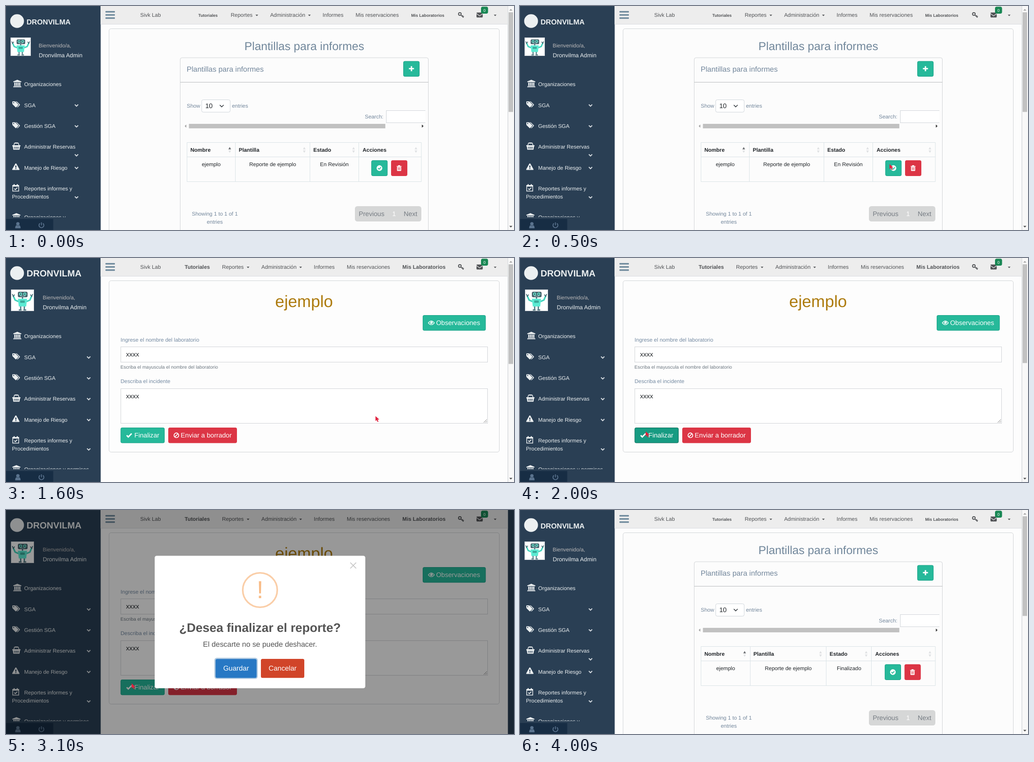
Recreate the animation shown at these times as an HTML page. Size 1124x498 px, loop 4.5 s.

```html
<!DOCTYPE html>
<html lang="es">
<head>
<meta charset="utf-8">
<title>Plantillas para informes</title>
<style>
  html, body { margin: 0; width: 100%; height: 100%; overflow: hidden; background: #2a3f54; }
  svg { display: block; width: 1124px; height: 498px; }
  text { font-family: "Liberation Sans", Arial, sans-serif; text-rendering: geometricPrecision; white-space: pre; }
</style>
</head>
<body>
<svg id="stage" viewBox="0 0 1124 498">
  <defs>
    <clipPath id="menuClip"><rect width="209" height="469.5"/></clipPath>
    <clipPath id="searchClip"><rect x="830" y="225" width="98" height="40"/></clipPath>
    <g id="bank"><path d="M9 0 18 3.8V5.2H0V3.8ZM2.3 6.2H5V12.8H2.3ZM6 6.2H8.5V12.8H6ZM9.6 6.2H12.1V12.8H9.6ZM13.1 6.2H15.8V12.8H13.1ZM1.2 13.2H16.8V14.4H1.2ZM0 15H18V16.6H0Z"/></g>
    <g id="tags">
      <path fill-rule="evenodd" d="M0 1Q0 0 1 0H5.3Q6.2 0 7 .8L13 6.8Q13.8 7.6 13 8.4L8.6 12.9Q7.8 13.7 7 12.9L.8 6.8Q0 6 0 5.2ZM3 1.7A1.2 1.2 0 1 0 3 4.1 1.2 1.2 0 1 0 3 1.7Z"/>
      <path d="M7.2 0H8.7Q9.6 0 10.4 .8L16.6 6.8Q17.4 7.6 16.6 8.4L12.1 12.9Q11.1 13.8 10.2 12.9L14.4 8.6Q15.2 7.6 14.4 6.8L8.4 .8Z"/>
    </g>
    <g id="basket">
      <path fill-rule="evenodd" d="M0 6H18V8.6H17L15.8 16H2.2L1 8.6H0ZM4.1 9.4V14H5.4V9.4ZM7 9.4V14H8.3V9.4ZM9.8 9.4V14H11.1V9.4ZM12.6 9.4V14H13.9V9.4Z"/>
      <path d="M3.2 6.5 4.8 1.2H13.2L14.8 6.5" fill="none" stroke="#ecf0f1" stroke-width="1.4"/>
      <path d="M6 0H12V2.2H6Z"/>
    </g>
    <g id="warn"><path fill-rule="evenodd" d="M8.2 0Q9 0 9.5.8L16.2 13Q16.8 14.6 15.2 14.6H1.2Q-.4 14.6.2 13L6.9.8Q7.4 0 8.2 0ZM6.9 4.8 7.2 9.4H9.2L9.5 4.8ZM7.1 10.6V12.6H9.3V10.6Z"/></g>
    <g id="cal" fill="none" stroke="#ecf0f1">
      <path d="M.8 2.8H14.2V15.4H.8Z" stroke-width="1.5"/>
      <path d="M.8 4.3H14.2" stroke-width="2.4"/>
      <path d="M4 0V4M11 0V4" stroke-width="2.2"/>
      <path d="M4.3 9.8 6.7 12.2 11 7.8" stroke-width="1.7"/>
    </g>
    <path id="chev" d="M-3.7-1.9 0 1.8 3.7-1.9" fill="none" stroke="#d3d9de" stroke-width="2.1"/>
    <path id="caret" d="M-3-1.5H3L0 1.6Z" fill="#515356"/>
    <g id="robot">
      <rect width="50" height="47" fill="#fff"/>
      <path d="M16 26 9 23 5 14M34 26 41 23 45 14" fill="none" stroke="#45d3bd" stroke-width="3.4"/>
      <path d="M3 10 5 15 8 11M42 11 45 15 47 10" fill="none" stroke="#3f6670" stroke-width="1.8"/>
      <path d="M25 16V21M21 36V43M29 36V43" stroke="#5b8790" stroke-width="3"/>
      <rect x="15" y="5" width="21" height="12" rx="3" fill="#44626b"/>
      <circle cx="21" cy="10" r="3.3" fill="#6fe8d2"/><circle cx="30" cy="10" r="3.3" fill="#6fe8d2"/>
      <circle cx="21" cy="10" r="1.4" fill="#223c46"/><circle cx="30" cy="10" r="1.4" fill="#223c46"/>
      <path d="M20 14.5H31" stroke="#b7d2d4"/>
      <path d="M15 20H35L33 37H17Z" fill="#5cebd3"/>
      <rect x="20" y="24" width="10" height="5" fill="#3aa999"/>
      <path d="M17 44.5H23M27 44.5H33" stroke="#3f6670" stroke-width="2.4"/>
    </g>
    <g id="okIcon"><circle r="6.3" fill="#fff"/><path d="M-3.2 0-.8 2.4 3.3-1.8" fill="none" stroke="#26b99a" stroke-width="1.9"/></g>
    <g id="trash" fill="#fff">
      <path d="M-5.5-4.6H-2.6L-1.8-6.4H1.8L2.6-4.6H5.5V-3.4H-5.5Z"/>
      <path fill-rule="evenodd" d="M-4.6-2.9H4.6V5Q4.6 6.4 3.4 6.4H-3.4Q-4.6 6.4-4.6 5ZM-2.7-1.4V4.4H-1.7V-1.4ZM-.5-1.4V4.4H.5V-1.4ZM1.7-1.4V4.4H2.7V-1.4Z"/>
    </g>
    <path id="arrow" d="M0 0V11L2.6 8.7 4.7 13 6.7 12 4.7 7.9 8.4 7.6Z" fill="#e0233f"/>
  </defs>
  <g id="view"></g>
</svg>
<script>
const BASE = 11.86, BIG = 14.6;
const GREEN = '#26b99a', RED = '#dc3545', SLATE = '#73879c', INK = '#212529', LIGHT = '#ecf0f1';
const MID = 'text-anchor="middle"', BOLD = 'font-weight="700"';

const txt = (x, y, s, fill, size = BASE, extra = '') =>
  `<text x="${x}" y="${y}" fill="${fill}" font-size="${size}" ${extra}>${s}</text>`;
const box = (x, y, w, h, fill, stroke = 'none', r = 0) =>
  `<rect x="${x}" y="${y}" width="${w}" height="${h}" rx="${r}" fill="${fill}" stroke="${stroke}"/>`;
const use = (id, x, y, fill = LIGHT, k = 1) =>
  `<use href="#${id}" transform="translate(${x} ${y}) scale(${k})" fill="${fill}"/>`;
const line = (d, stroke, w = 1) => `<path d="${d}" fill="none" stroke="${stroke}" stroke-width="${w}"/>`;
const shape = (d, fill) => `<path d="${d}" fill="${fill}"/>`;

function sidebar(wide) {
  const px = wide ? 82 : 73, cx = wide ? 183 : 156;
  const items = [
    ['bank', 16, 164, 'Organizaciones', 178.2],
    ['tags', 14, 212, 'SGA', 224.6, 221],
    ['tags', 14, 258.4, 'Gestión SGA', 271, 267.3],
    ['basket', 14, 303.5, 'Administrar Reservas', 317.4, wide ? 313.5 : 331.7],
    ['warn', 13.6, 350, 'Manejo de Riesgo', 363.8, 360],
    ['cal', 14, 396, 'Reportes informes y', 410, 425.3],
    ['bank', 14, 460.5, 'Organizaciones y' + (wide ? ' permisos' : ''), 474.4]
  ];
  const menu = items.map(([icon, x, y, label, base, cy]) =>
    use(icon, x, y) + txt(40.3, base, label, LIGHT) + (cy ? use('chev', cx, cy) : '')).join('');
  const [ax, aw, ah] = wide ? [11, 51, 48] : [10, 45, 41];
  return box(0, 0, 209.3, 498, '#2a3f54') +
    '<circle cx="24.5" cy="33.5" r="15.3" fill="#ecf0f1"/>' +
    txt(45.5, wide ? 41.2 : 40.8, 'DRONVILMA', LIGHT, wide ? 20.06 : 16.1, BOLD) +
    `<g transform="translate(${ax} 70) scale(${aw / 50} ${ah / 47})"><use href="#robot"/></g>` +
    box(ax + .5, 70.5, aw - 1, ah - 1, 'none', '#cfd5d9') +
    txt(px - .7, 92, 'Bienvenido/a,', '#bab8b8') +
    txt(px - .5, 113.6, 'Dronvilma Admin', LIGHT, 12.77) +
    `<g clip-path="url(#menuClip)">${menu}${txt(13.2, 428.2, 'Procedimientos', LIGHT)}</g>` +
    box(0, 473.5, 104.5, 25, '#172d44') +
    '<circle cx="26.3" cy="484.3" r="3.7" fill="#5a738e"/>' +
    shape('M20.4 494.3Q20.2 488 23.4 487.5 26.3 489.5 29.2 487.5 32.4 488 32.2 494.3Z', '#5a738e') +
    line('M75 483.3A5.4 5.4 0 1 0 81.8 483.3M78.4 481V487.4', '#5a738e', 1.9);
}

function navbar(wide) {
  const c = '#515356', size = wide ? BASE : 9.12, d = wide ? -19.4 : 0;
  const base = wide ? 24.4 : 23.9;
  return box(209.3, 0, 901, 41, '#ededed') + box(209.3, 40, 901, 1, '#d9dcdf') +
    [11.2, 18.2, 25.2].map(y => box(220, y, 21, 3.4, '#6a8699', 'none', 1)).join('') +
    txt(297, 24.4, 'Sivk Lab', c) +
    txt(wide ? 395.3 : 425.5, base, 'Tutoriales', c, size, BOLD) +
    txt(497.3 + d, 24.4, 'Reportes', c) + use('caret', 555 + d, 20.8) +
    txt(584.4 + d, 24.4, 'Administración', c) + use('caret', 671.3 + d, 20.8) +
    txt(700.5 + d, 24.4, 'Informes', c) +
    txt(773.5 + d, 24.4, 'Mis reservaciones', c) +
    txt(wide ? 877 : 896.5, base, 'Mis Laboratorios', c, size, BOLD) +
    `<circle cx="1004.2" cy="17.8" r="3" fill="none" stroke="${c}" stroke-width="1.9"/>` +
    line('M1006.2 19.8 1012.2 25.6M1009 22.6 1011 20.6M1011 24.6 1012.9 22.7', c, 1.7) +
    shape('M1041 16.2Q1041 14.6 1042.4 14.6H1053.4Q1054.8 14.6 1054.8 16.2L1047.9 21.2Z', c) +
    shape('M1041 17.8 1047.9 22.7 1054.8 17.8V24Q1054.8 25.4 1053.4 25.4H1042.4Q1041 25.4 1041 24Z', c) +
    box(1051, 1.5, 15.6, 15.6, '#198754', 'none', 4) +
    txt(1058.8, 12.5, '0', '#fff', 8.9, MID) + use('caret', 1082.3, 20.8);
}

const scrollbar = end => box(1110.5, 0, 13.5, 498, '#f8f8f8') + box(1112, 14, 10, end - 14, '#c1c1c1') +
  shape('M1113.6 10.2 1117 6.4 1120.4 10.2Z', '#a3a3a3') + shape('M1113.6 488.8 1117 492.6 1120.4 488.8Z', '#505050');

const button = (x, y, w, h, fill, edge) => box(x + .5, y + .5, w - 1, h - 1, fill, edge, 2.7);

function table(done) {
  const cols = done ? [400.5, 509.5, 677.5, 777.5, 919] : [400.5, 507.5, 672.5, 780.5, 919];
  const heads = done ? [408, 516.6, 685, 786] : [408, 515, 680, 789];
  const sorts = done ? [497, 665, 766, 907] : [495, 660, 769, 907];
  const cells = done ? [455, 593.5, 728] : [454, 590, 726.5];
  const bx = done ? 807 : 808.3;
  const edge = '#d9e2e6';
  return line(`M400.5 303.5H919V390.5H400.5ZM400.5 335.5H919${cols.slice(1, 4).map(x => `M${x} 303.5V390.5`).join('')}`, edge) +
    ['Nombre', 'Plantilla', 'Estado', 'Acciones'].map((s, i) =>
      txt(heads[i], 324, s, INK, BASE, BOLD) +
      shape(`M${sorts[i] - 3} 318.8h6l-3-5.2Z`, i ? '#dfe1e3' : '#6b6e72') +
      shape(`M${sorts[i] - 3} 321.3h6l-3 5.2Z`, '#dfe1e3')).join('') +
    ['ejemplo', 'Reporte de ejemplo', done ? 'Finalizado' : 'En Revisión'].map((s, i) =>
      txt(cells[i], 356.4, s, INK, BASE, MID)).join('') +
    button(bx, 343, 36, 35, GREEN, '#169f85') + use('okIcon', bx + 18, 360.4) +
    button(bx + 43.7, 343, 36, 35, RED, RED) + use('trash', bx + 61.5, 360.4);
}

function list(done) {
  return box(228, 50.5, 863.5, 480, '#fcfcfc', '#d0d3d6', 4.5) +
    txt(660, 98.2, 'Plantillas para informes', '#71879b', 25.5, MID) +
    box(385.5, 115, 549, 420, '#fcfcfc', '#d0d3d6', 4) +
    line('M385.5 169.5H934.5', '#b5b8ba') +
    txt(399.8, 146.2, 'Plantillas para informes', SLATE, 16.4) +
    button(879, 122.5, 36, 34.5, GREEN, '#169f85') +
    line('M891.5 139.3H902.7M897.1 133.7V144.9', '#fff', 3) +
    txt(400, 226.4, 'Show', SLATE) +
    box(433, 208.5, 63, 27.5, '#fff', '#ced4da', 3.5) +
    txt(441, 227.3, '10', INK, BIG) + line('M473 220 477.3 224.3 481.6 220', '#343a40', 1.6) +
    txt(500, 226.4, 'entries', SLATE) + txt(794, 249.8, 'Search:', SLATE) +
    `<g clip-path="url(#searchClip)">${box(841.5, 232.5, 120, 27, '#fff', '#cfd3d8')}</g>` +
    box(404.7, 262, 434.6, 10, '#c1c1c1') +
    shape('M399 263.6 395.4 267 399 270.4Z', '#a3a3a3') + shape('M920 263.4 924 267 920 270.6Z', '#404040') +
    table(done) +
    txt(462, 466.4, 'Showing 1 to 1 of 1', SLATE, BASE, MID) + txt(462, 484, 'entries', SLATE, BASE, MID) +
    box(772, 445, 147, 34, '#d6d7d7', 'none', 5.5) +
    txt(780.5, 467.3, 'Previous', '#757b82', BIG) + txt(854.6, 467.3, '1', '#fff', BIG) +
    txt(880, 467.3, 'Next', '#757b82', BIG);
}

function form(hover) {
  return box(228, 50.5, 863.5, 381, '#fdfdfd', '#d0d3d6', 4.5) +
    txt(659.5, 109, 'ejemplo', '#ad7b0e', 36.5, MID) +
    button(922, 127, 139.5, 34.5, GREEN, '#169f85') +
    line('M934.4 144.2Q941 135.6 947.7 144.2 941 152.6 934.4 144.2Z', '#fff', 1.4) +
    '<circle cx="941" cy="143.4" r="3" fill="#fff"/><circle cx="940" cy="142.4" r="1" fill="#26b99a"/>' +
    txt(951.7, 149.3, 'Observaciones', '#fff', BIG) +
    txt(253.5, 185.5, 'Ingrese el nombre del laboratorio', '#748aa2') +
    box(254, 197.5, 811.5, 34, '#fff', '#cfd2d6') + txt(265.4, 219, 'xxxx', INK, BIG) +
    txt(253.3, 246.3, 'Escriba el mayuscula el nombre del laboratorio', '#6c7780', 10.38) +
    txt(253.5, 278, 'Describa el incidente', '#748aa2') +
    box(254, 290.5, 811.5, 77, '#fff', '#cfd2d6') + txt(265.4, 311.8, 'xxxx', INK, BIG) +
    line('M1057 366 1064 359M1061 366 1064 363', '#777') +
    button(253.5, 377, 97.5, 34.5, hover ? '#179b82' : GREEN, hover ? '#0d6b59' : '#169f85') +
    line('M267 394.2 270.6 397.8 278 390.2', '#fff', 3) + txt(284, 399.3, 'Finalizar', '#fff', BIG) +
    button(359, 377, 152, 34.5, RED, RED) +
    '<circle cx="377" cy="394.2" r="5.2" fill="none" stroke="#fff" stroke-width="1.8"/>' +
    line('M373.4 397.8 380.6 390.6', '#fff', 1.8) + txt(386.6, 399.3, 'Enviar a borrador', '#fff', BIG);
}

function modal(hover) {
  return '<rect width="1124" height="498" opacity=".4"/>' +
    box(329, 101.7, 466, 294.5, '#fff', 'none', 4.5) +
    line('M761.8 116.8 774.8 129.8M774.8 116.8 761.8 129.8', '#c6c6c6', 1.7) +
    '<circle cx="562" cy="178" r="38.2" fill="none" stroke="#facea8" stroke-width="3.6"/>' +
    txt(562, 196.3, '!', '#f8bb86', 54.7, MID) +
    txt(562, 271, '¿Desea finalizar el reporte?', '#545454', 27.36, MID + BOLD.padStart(18)) +
    txt(562, 304, 'El descarte no se puede deshacer.', '#545454', 16.4, MID) +
    box(461, 328.5, 96, 47, '#b1cae1', 'none', 5.5) +
    box(463.7, 331.2, 90.8, 42, hover ? '#236cb0' : '#2778c4', 'none', 3.5) +
    txt(509.2, 357.3, 'Guardar', '#fff', 15.5, MID) +
    box(564, 331, 96, 42.3, '#d14529', 'none', 3.5) +
    txt(612, 357.3, 'Cancelar', '#fff', 15.5, MID);
}

// start time, page, and what differs on it
const steps = [
  { at: 0, page: 'list' },
  { at: 500, page: 'list', cursor: [817.5, 351.5] },
  { at: 1000, page: 'form', cursor: [817.5, 351.5] },
  { at: 2000, page: 'form', hover: true, end: 233.5, cursor: [278, 385.5] },
  { at: 2500, page: 'form', ask: true, cursor: [278, 385.5] },
  { at: 3500, page: 'form', ask: true, hover: true, cursor: [486, 341.5] },
  { at: 4000, page: 'list', done: true }
];
const LOOP = 4500;

function scene({ page, cursor, hover, ask, done, end = 235.5 }) {
  const wide = page === 'form';
  return box(209.3, 0, 901.2, 498, '#fdfdfd') + sidebar(wide) + navbar(wide) +
    (wide ? form(hover && !ask) : list(done)) +
    (ask ? modal(hover) : scrollbar(end)) +
    (cursor ? use('arrow', ...cursor) : '');
}

const view = document.getElementById('view');
const start = performance.now();
let shown = null;
function tick() {
  const t = (performance.now() - start) % LOOP;
  const step = steps.findLast(s => s.at <= t);
  if (step !== shown) {
    view.innerHTML = scene(step);
    shown = step;
  }
  requestAnimationFrame(tick);
}
tick();
</script>
</body>
</html>
```
